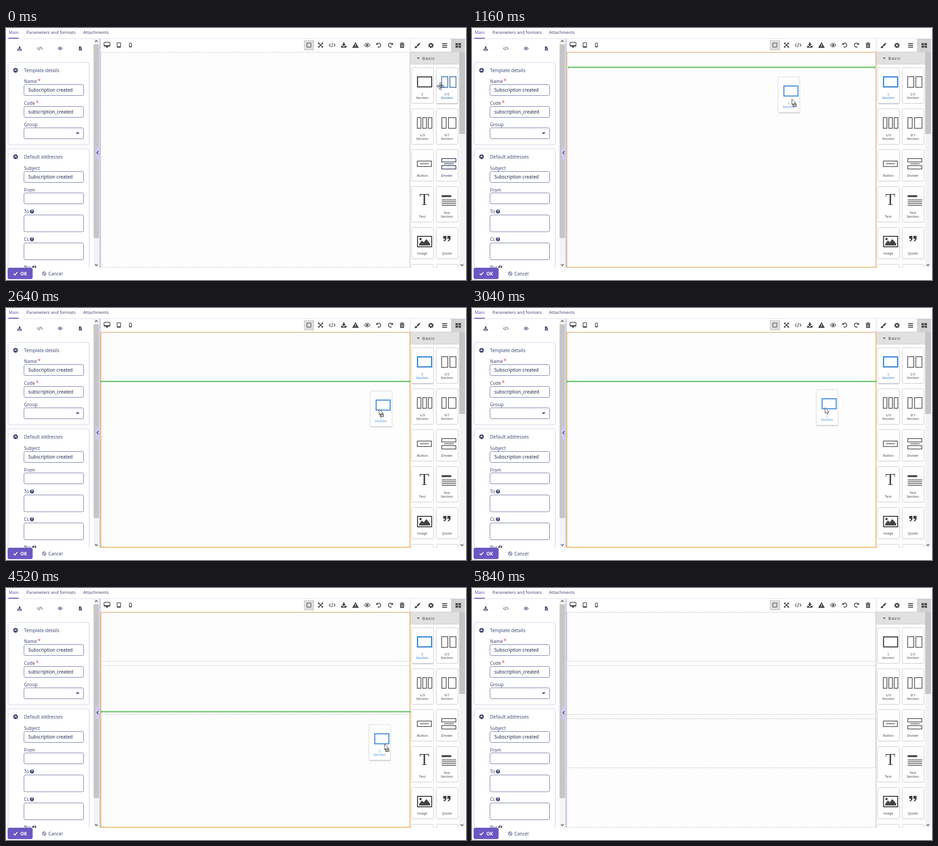
These frames come from a looping animation (1011 by 554 pixels, 7400 ms). An HTML page:

```html
<!DOCTYPE html>
<html lang="en">
<head>
<meta charset="utf-8">
<title>Template editor</title>
<style>
html, body { margin: 0; width: 100%; height: 100%; overflow: hidden; background: #fff; }
svg { display: block; width: 1011px; height: 554px; font: 10.1px "Noto Sans", "Open Sans", sans-serif; }
.tab { font-size: 9.45px; }
.block { font: 7.5px "Liberation Sans", Arial, sans-serif; letter-spacing: .3px; text-anchor: middle; }
.line { fill: none; stroke: currentColor; }
</style>
</head>
<body>
<svg id="stage" viewBox="0 0 1011 554"></svg>
<script>
const INK = '#414a72', DARK = '#444', LILAC = '#d0caef', BLUE = '#3b97e3';

// Drawing helpers
const rect = (x, y, w, h, fill, more = '') =>
  `<rect x="${x}" y="${y}" width="${w}" height="${h}" fill="${fill}" ${more}/>`;
const box = (x, y, w, h, stroke, sw = 1, more = '') =>
  rect(x, y, w, h, 'none', `stroke="${stroke}" stroke-width="${sw}" ${more}`);
const path = (d, fill, more = '') => `<path d="${d}" fill="${fill}" ${more}/>`;
const stroke = (d, color, sw = 1, more = '') =>
  path(d, 'none', `stroke="${color}" stroke-width="${sw}" ${more}`);
const text = (x, y, s, fill = INK, more = '') => `<text x="${x}" y="${y}" fill="${fill}" ${more}>${s}</text>`;
const disc = (x, y, r, fill) => `<circle cx="${x}" cy="${y}" r="${r}" fill="${fill}"/>`;
const put = (x, y, s, scale = 1) => `<g transform="translate(${x} ${y}) scale(${scale})">${s}</g>`;

// Icons, centred on the origin
const icon = {
  download: c => path('M-1.6-6H1.6V-2H4.5L0 2.5-4.5-2H-1.6ZM-6 1.5H-3L0 4.3 3 1.5H6V5.5H-6Z', c),
  code: c => stroke('M-3.5-3.5-6.5 0-3.5 3.5M3.5-3.5 6.5 0 3.5 3.5M1.3-5-1.3 5', c, 1.3),
  eye: c => stroke('M-6 0Q0-8 6 0Q0 8-6 0Z', c, 1.3) + disc(0, 0, 2.3, c),
  file: c => path('M-4-5.5H1.2V-2H4V5.5H-4ZM2-5.5 4-3H2Z', c) + stroke('M-2 .5H2M-2 2.8H2', '#fff', .9),
  desktop: c => box(-6.5, -5.5, 13, 8.5, c, 1.5, 'rx="1"') + path('M-6 1H6V3H-6ZM-1.5 3H1.5L2.5 6H-2.5Z', c),
  tablet: c => box(-3.8, -5, 7.6, 10, c, 1.4, 'rx="1"') + rect(-4, 2.8, 8, 2, c),
  phone: c => box(-2.4, -4.3, 4.8, 8.6, c, 1.3, 'rx="1"') + rect(-2.5, 2.5, 5, 1.6, c),
  frame: c => box(-4.5, -4.5, 9, 9, c, 1.2, 'rx="1.5"'),
  expand: c => stroke('M-4-4 4 4M4-4-4 4', c, 1.7) +
    path('M-5.5-5.5H-1.5L-5.5-1.5ZM5.5-5.5V-1.5L1.5-5.5ZM5.5 5.5H1.5L5.5 1.5ZM-5.5 5.5V1.5L-1.5 5.5Z', c),
  warn: c => path('M0-6 6.5 5.5H-6.5Z', c, `stroke="${c}" stroke-linejoin="round"`) +
    stroke('M0-2.5V1.5M0 2.7V4.3', '#fff', 1.5),
  undo: c => stroke('M-3.8-2.3A4.4 4.4 0 1 1-2.6 3.6', c, 1.7) + path('M-5.7-5.5V-.8H-1Z', c),
  redo: c => `<g transform="scale(-1 1)">${icon.undo(c)}</g>`,
  trash: c => path('M-5-5H-2L-1-6.2H1L2-5H5V-3.4H-5ZM-4.3-2.6H4.3V6H-4.3Z', c) +
    stroke('M-1.8-1V4.3M0-1V4.3M1.8-1V4.3', '#fff', .8),
  brush: c => path('M6.5-6Q4-6-1.5.2L.8 2.6Q6.5-3 6.5-6ZM-2.2 1Q-4.8 1-5 4L-6.5 4.6Q-4 7-1.5 5.5 0 4.5 0 3.2Z', c),
  gear: c => `<circle r="3.3" class="line" stroke-width="2.7" color="${c}"/>` +
    `<circle r="5" class="line" stroke-width="2" color="${c}" stroke-dasharray="2.2 1.73"/>`,
  bars: c => stroke('M-5.5-4H5.5M-5.5 0H5.5M-5.5 4H5.5', c, 1.9),
  grid: c => path('M-6-5H-.6V-.5H-6ZM.6-5H6V-.5H.6ZM-6 .6H-.6V5H-6ZM.6 .6H6V5H.6Z', c),
  up: c => disc(0, 0, 5.2, c) + stroke('M-2.5 1.2 0-1.4 2.5 1.2', '#fff', 1.4),
  help: c => disc(0, 0, 4.6, c) + text(0, 2.9, '?', '#fff', 'font-size="8" font-weight="800" text-anchor="middle"'),
};
const draw = (name, x, y, c = DARK, scale = 1) => put(x, y, icon[name](c), scale);

// Blocks, drawn relative to the card's corner in currentColor
const outline = (x, y, w, h, sw = 1.5) => `<rect class="line" x="${x}" y="${y}" width="${w}" height="${h}" stroke-width="${sw}"/>`;
const bars = (d, sw = 1.4) => `<path class="line" d="${d}" stroke-width="${sw}"/>`;
const quote = x => path(`M${x} 19h7v6q0 5-6 6v-2.3q3-.7 3-3.2h-4z`, 'currentColor');
const blocks = [
  ['1', 'Section', outline(13.5, 20.5, 31, 22, 2.4)],
  ['1/2', 'Section', outline(12.5, 20, 13.5, 23.5) + outline(30.5, 20, 13.5, 23.5)],
  ['1/3', 'Section', outline(13, 20, 8, 23.5) + outline(25, 20, 8, 23.5) + outline(37, 20, 8, 23.5)],
  ['3/7', 'Section', outline(13, 20, 9.5, 23.5) + outline(27.5, 20, 16.5, 23.5)],
  ['', 'Button', outline(13, 25.5, 31, 12) + bars('M19 31.5H38')],
  ['', 'Divider', outline(12.7, 20, 31, 7.5) + bars('M18 31.5H39') + outline(12.7, 35.5, 31, 7.5)],
  ['', 'Text', '<text x="28.5" y="41" font-family="Liberation Serif, serif" font-size="35" text-anchor="middle" fill="currentColor">T</text>'],
  ['Text', 'Section', rect(12.5, 19.5, 21, 4.2, 'currentColor') + bars('M12.5 30H44.5M12.5 34H44.5M12.5 38H44.5M12.5 42H44.5', 1.5)],
  ['', 'Image', outline(13.5, 20, 31, 23, 2.2) + path('M17 40V37L23 29 27 33 33 26 41 36V40Z', 'currentColor') + disc(20, 26, 2.5, 'currentColor')],
  ['', 'Quote', quote(16) + quote(25)],
  ['', '', ''], ['', '', ''],
];
const rowY = [87, 177, 267, 348, 438, 519], rowH = [79, 79, 70, 79, 70, 79];
const cardAt = (i, x, y, color, raised) => {
  const [top, label, art] = blocks[i], h = rowH[i >> 1];
  const caption = (yy, s) => text(24, yy, s, 'currentColor', 'class="block"');
  return put(x, y, `<g style="color:${color}">` +
    rect(1, raised ? 3 : 1.5, 48, h - 1, '#000', `opacity="${raised ? .16 : .08}" rx="3"`) +
    rect(.5, .5, 48, h - 1, '#fff', 'rx="2" stroke="#c8c8c8"') + art +
    (top ? caption(h - 18.5, top) : '') + caption(h - 10, label) + '</g>');
};

// Static page
const field = (y, h, value = '') =>
  rect(39.5, y + .5, 131, h, '#fff', 'rx="3.5" stroke="#69719f"') + text(49, y + 16, value, '#1d2747');
const panel = (y, h, title) => box(4.5, y + .5, 178.5, h, LILAC, 1.2, 'rx="4"') +
  draw('up', 21, y + 18, INK) + text(39.5, y + 22, title);
const label = (y, s, star, help) => text(39.5, y, s + (star ? ' <tspan dx="-1" fill="#e5484d" font-size="12">*</tspan>' : '')) +
  (help ? draw('help', help, y - 3.5, INK) : '');
const caret = (x, y, dir) => stroke(`M${x - 3} ${y - 1.5 * dir}L${x} ${y + 1.5 * dir}L${x + 3} ${y - 1.5 * dir}`, '#505050', 1.7);

const leftSide =
  ['download', 'code', 'eye', 'file'].map((n, i) => draw(n, 30 + i * 44.5, 45, INK, .8)).join('') +
  panel(75, 181, 'Template details') + panel(265, 300, 'Default addresses') +
  label(121, 'Name', true) + field(124, 24, 'Subscription created') +
  label(168.5, 'Code', true) + field(172, 24, 'subscription_created') +
  label(216, 'Group') + field(219, 24) + path('M153.5 229.5h8l-4 4.3z', '#2f5573') +
  label(312, 'Subject') + field(315, 24, 'Subscription created') +
  label(359.5, 'From') + field(362, 24) +
  label(407, 'To', false, 57) + field(410.5, 37) +
  label(468, 'Cc', false, 57) + field(472, 37) +
  label(530, 'Bcc', false, 62) +
  rect(192.5, 24, 12, 503, '#f4f4f4') + rect(192.5, 36, 12, 426, '#c6c6c6') +
  caret(198.5, 29, -1) + caret(198.5, 521, 1) +
  rect(205, 24, 3, 503, LILAC) + path('M208 261H200Q197 261 197 264V285Q197 288 200 288H208Z', LILAC) +
  stroke('M203 270.5 199.8 274 203 277.5', '#2d3561', 1.4);

const tools = ['frame', 'expand', 'code', 'download', 'warn', 'eye', 'undo', 'redo', 'trash'];
const header =
  text(6, 13, 'Main', '#6a4fc0', 'class="tab"') + text(45, 13, 'Parameters and formats', INK, 'class="tab"') +
  text(169.5, 13, 'Attachments', INK, 'class="tab"') +
  rect(0, 23, 1011, 1, '#dcd8f2') + rect(5, 21.5, 23, 2, '#6a4fc0') +
  draw('desktop', 222, 37) + draw('tablet', 248, 37.5) + draw('phone', 273.5, 37.5) +
  box(655.5, 27.5, 21, 21, '#c6c6c6', 1, 'style="fill:#dcdcdc"') +
  tools.map((n, i) => draw(n, 665.7 + i * 25.6, 37.7)).join('');

const rightSide =
  rect(888, 24, 1, 503, '#d0d0d0') + rect(978, 24, 31, 29, '#d2d2d2') +
  ['brush', 'gear', 'bars', 'grid'].map((n, i) => draw(n, 904 + i * 30, 38.3)).join('') +
  rect(889, 53, 107, 27, '#e1e1e1') + rect(889, 52, 107, 1, '#cfcfcf') + rect(889, 79, 107, 1, '#cbcbcb') +
  path('M903 65h6l-3 3.2z', DARK) +
  text(915, 69.5, 'Basic', DARK, 'style="font:9.3px Liberation Sans,Arial,sans-serif;letter-spacing:1px"') +
  rect(996, 53, 13, 474, '#f3f3f3') + rect(996, 53, 13, 180, '#c5c5c5') + caret(1002, 521, 1);

const footer =
  rect(0, 527, 1011, 27, '#fff') + rect(3.5, 527, 55, 25, '#6c57c2', 'rx="4"') +
  stroke('M17 540 19.8 542.8 25 536.8', '#fff', 1.9) + text(31.5, 543.5, 'OK', '#fff', 'font-weight="600"') +
  '<circle cx="84" cy="540" r="3.8" fill="none" stroke="#414a72" stroke-width="1.2"/>' +
  stroke('M81.5 537.5 86.5 542.5', INK, 1.2) + text(93, 543.5, 'Cancel', INK, 'font-weight="500"');

stage.innerHTML = rect(208, 53, 680, 474, '#fdfdfd') + leftSide + header + rightSide +
  '<g id="cards"></g><g id="canvas"></g>' + footer + '<g id="pointer"></g>';

// Timelines: each entry holds from its time until the next one
const at = (list, t) => list.filter(k => k[0] <= t).pop() || [0, 0];
const pointerPath = [
  [0, 'move', 955, 128], [120, 'move', 948, 142], [240, 'move', 937, 160], [790, 'drag', 960, 152],
  [1040, 'drag', 800, 165], [1160, 'drag', 703, 156], [1280, 'drag', 655, 141], [1410, 'drag', 642, 131],
  [1680, 'arrow', 642, 130], [1830, 'arrow', 770, 126], [1980, 'arrow', 860, 140],
  [2100, 'move', 900, 148], [2220, 'move', 911, 127], [2370, 'drag', 897, 170], [2490, 'drag', 877, 188],
  [2640, 'drag', 820, 222], [2760, 'drag', 790, 219], [2890, 'drag', 775, 218], [3040, 'arrow', 776, 219],
  [3190, 'arrow', 778, 222], [3310, 'arrow', 840, 210], [3460, 'arrow', 895, 190], [3580, 'arrow', 911, 167],
  [3700, 'move', 922, 142], [3850, 'move', 926, 130], [4130, 'drag', 926, 130],
  [4280, 'drag', 895, 215], [4400, 'drag', 862, 290], [4520, 'drag', 832, 343], [4670, 'drag', 790, 350],
  [4790, 'drag', 760, 352], [4940, 'arrow', 742, 358], [5180, 'arrow', 738, 363], [5330, 'arrow', 672, 397],
  [5480, 'arrow', 590, 440], [5600, 'arrow', 500, 490], [5720, 'arrow', 440, 535], [5840, 'none', 0, 0],
];
const grabs = [[1040, 31, 49], [1680, 0], [2370, 20, 40], [3190, 0], [4280, 35, 43], [4940, 0]];
const lines = [[1040, 86.5], [1680, 0], [2640, 161.5], [3190, 0], [4280, 272], [4670, 282.5], [4940, 0]];
const tints = [[240, .5], [390, 1], [1830, .5], [1980, 0], [2100, .5], [2220, 1], [3190, .5], [3310, 0],
  [3700, .5], [3850, 1], [4940, .5], [5060, 0]];
const halfTints = [[0, .9], [120, .7], [240, .4], [390, 0]];
const raised = [[0, 1], [240, 0], [1680, -1], [2100, 0], [3190, -1], [3580, 2], [3700, 0], [4940, -1]];
const cellCount = [[1680, 1], [3190, 2], [4940, 3]];
const hovers = [[1680, 'cell'], [1980, ''], [3190, 'cell'], [3460, ''], [4940, 'cell'], [5480, 'all'], [5840, '']];

const tint = p => `rgb(${[[68, 30], [68, 120], [68, 214]].map(([a, b]) => Math.round(a + (b - a) * p))})`;
const arrow = path('M0 0V12.5L2.8 10 4.8 14.5 6.9 13.6 5 9.3H8.8Z', '#fff', 'stroke="#222" stroke-width=".9"');
const arms = [0, 90, 180, 270].map(a => `<path transform="rotate(${a})" d="M-1-2V-5H-3L0-8.5 3-5H1V-2" fill="#fff" stroke="#223" stroke-width=".9"/>`).join('');
const pointers = {
  none: '', arrow, drag: box(2.5, 11.5, 7, 5, '#444', 1.4, 'style="fill:#fff"') + arrow,
  move: arms + box(-1.5, -1.5, 3, 3, '#223', .9, 'style="fill:#fff"'),
};

function cardsView(t) {
  const up = at(raised, t)[1];
  return blocks.map((b, i) => {
    const p = i === 0 ? at(tints, t)[1] : i === 1 ? at(halfTints, t)[1] : 0;
    const color = i === 1 && p ? `rgb(${68 - 44 * p},${68 + 30 * p},${68 + 96 * p})` :
      i === 5 && t < 120 ? '#2c3858' : tint(p);
    return cardAt(i, 891 + i % 2 * 54, rowY[i >> 1], color, i === up);
  }).join('');
}

function canvasView(t) {
  const y = at(lines, t)[1], count = at(cellCount, t)[1], hover = at(hovers, t)[1];
  const dashed = (yy, h) => box(208.5, yy, 679, h, '#b0b0b0', 1, 'stroke-dasharray="2 2"');
  let s = y ? box(208.5, 53.5, 679.5, 472.5, '#f4b556', 1.6) : '';
  s += dashed(53.5, 472.5);
  for (let i = 0; i < count; i++) s += dashed(53.5 + i * 117, 107.7);
  if (y) {
    if (count) s += stroke('M208.5 53V526H888V53', '#f4b556', 1.3);
    const a = count ? 208 : 211, b = count ? 889 : 886;
    s += rect(a, y - 1.3, b - a, 2.6, '#62c462') +
      path(`M${a} ${y - 3.2}l4 3.2-4 3.2zM${b} ${y - 3.2}l-4 3.2 4 3.2z`, '#62c462');
  }
  if (hover === 'all') s += box(208.5, 53.5, 679.5, 472.5, BLUE);
  if (hover === 'cell') {
    const top = 53.5 + (count - 1) * 117, tag = count > 1 ? top - 15 : top - .5;
    s += box(208, top, 680.5, 108, BLUE, 1.2) + rect(208, tag, 45, 15, BLUE) +
      text(211, tag + 10.8, 'Table cell', '#fff', 'font-size="8.6"');
  }
  return s;
}

function pointerView(t) {
  const [, kind, x, y] = at(pointerPath, t), [, gx, gy] = at(grabs, t);
  const ghost = gx ? `<g opacity=".8">${cardAt(0, x - gx, y - gy, tint(1), true)}</g>` : '';
  return ghost + put(x, y, pointers[kind]);
}

const views = { cards: cardsView, canvas: canvasView, pointer: pointerView }, last = {};
function frame(now) {
  const t = now % 7400;
  for (const id in views) {
    const html = views[id](t);
    if (html !== last[id]) document.getElementById(id).innerHTML = last[id] = html;
  }
  requestAnimationFrame(frame);
}
frame(0);
</script>
</body>
</html>
```
